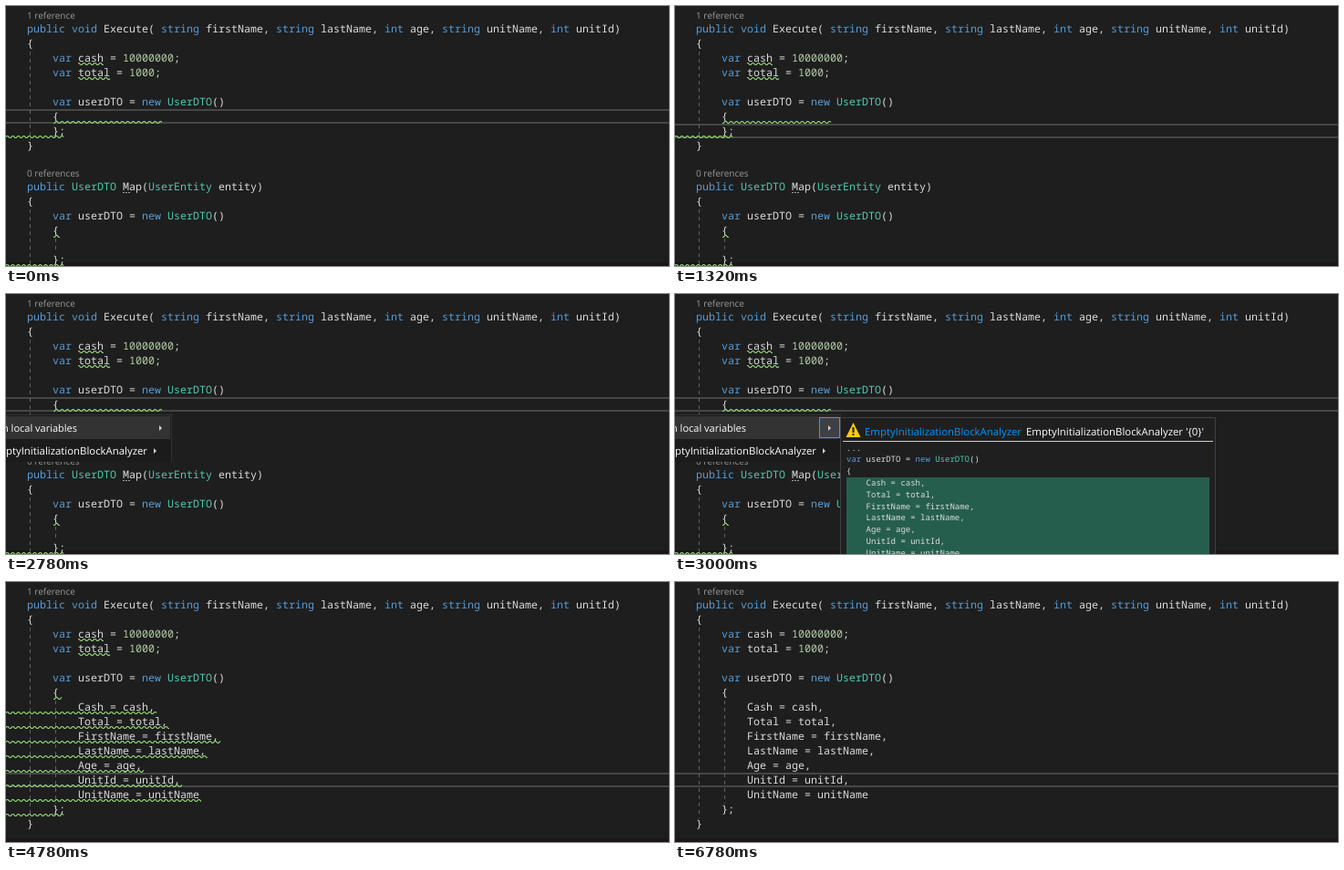
An HTML page with a canvas that plays this animation: 727 by 285 pixels, repeating every 7790 ms.

```html
<!DOCTYPE html>
<html lang="en">
<head>
<meta charset="utf-8">
<style>
  html, body { margin: 0; width: 100%; height: 100%; overflow: hidden; background: #1e1e1e; }
  canvas { display: block; }
</style>
</head>
<body>
<canvas id="stage" width="727" height="285"></canvas>
<script>
const ctx = document.getElementById('stage').getContext('2d');
const WIDTH = 727, HEIGHT = 285, LOOP = 7790;
const LEFT = 23, COL = 7, LINE = 16;
const MONO = '"Noto Sans Mono", monospace';
const SANS = '"Open Sans", sans-serif';
const TEXT = '#dcdcdc';

const SIGNATURE = 'public void Execute( string firstName, string lastName, int age, string unitName, int unitId)';
const FIELDS = ['Cash = cash,', 'Total = total,', 'FirstName = firstName,', 'LastName = lastName,',
  'Age = age,', 'UnitId = unitId,', 'UnitName = unitName'];

// Pointer keyframes: start time, then x and y of the centre; no position hides it.
const POINTER = [
  [0], [120, 268, 274], [200, 160, 184], [280, 110.5, 144], [420, 105.5, 139],
  [560, 95.5, 136], [640, 86.5, 133.5], [800, 84.5, 134], [940, 98.5, 195], [1020],
  [6620, 503.5, 287], [6700, 491.5, 288], [6780]
];

const within = (t, from, to) => t >= from && t < to;

function box(x, y, w, h, color) {
  ctx.fillStyle = color;
  ctx.fillRect(x, y, w, h);
}

function frame(x, y, w, h, color) {
  ctx.strokeStyle = color;
  ctx.lineWidth = 1;
  ctx.strokeRect(x + 0.5, y + 0.5, w - 1, h - 1);
}

function label(text, x, y, size, color, align = 'left') {
  ctx.font = `${size}px ${SANS}`;
  ctx.textAlign = align;
  ctx.fillStyle = color;
  ctx.fillText(text, x, y);
}

function tokenColor(token) {
  if (/^(public|void|string|int|var|new)$/.test(token)) return '#569cd6';
  if (/^User(DTO|Entity)$/.test(token)) return '#4ec9b0';
  return /^\d/.test(token) ? '#b5cea8' : TEXT;
}

function code(text, x, y, advance = COL) {
  ctx.font = `500 ${advance / 0.6}px ${MONO}`;
  ctx.textAlign = 'left';
  for (const { 0: token, index } of text.matchAll(/\w+|[^\w\s]+/g)) {
    ctx.fillStyle = tokenColor(token);
    ctx.fillText(token, x + index * advance, y);
  }
}

function lines(list, y) {
  list.forEach((text, i) => code(text, LEFT, y + i * LINE));
}

function squiggle(from, to, baseline) {
  ctx.strokeStyle = '#8fd675';
  ctx.lineWidth = 1.1;
  ctx.beginPath();
  for (let x = from; x <= to; x++) {
    ctx.lineTo(x, baseline + 2.5 - 1.2 * Math.sin(x * Math.PI / 3));
  }
  ctx.stroke();
}

function guide(x, from, to) {
  ctx.strokeStyle = '#626262';
  ctx.lineWidth = 1;
  ctx.setLineDash([4, 4]);
  ctx.beginPath();
  ctx.moveTo(x + 0.5, from);
  ctx.lineTo(x + 0.5, to);
  ctx.stroke();
  ctx.setLineDash([]);
}

function currentLine(y) {
  box(0, y, WIDTH, 2, '#464646');
  box(0, y + 14, WIDTH, 2, '#464646');
}

function triangle(x1, y1, x2, y2, x3, y3, color) {
  ctx.fillStyle = color;
  ctx.beginPath();
  ctx.moveTo(x1, y1);
  ctx.lineTo(x2, y2);
  ctx.lineTo(x3, y3);
  ctx.fill();
}

function header(references) {
  label(references, LEFT, 14, 10, '#999999');
  lines([SIGNATURE, '{', '    var cash = 10000000;', '    var total = 1000;', '',
    '    var userDTO = new UserDTO()', '    {'], 29);
}

function emptyCode() {
  header('1 reference');
  guide(26, 50, 147);
  lines(['    };', '}'], 141);
  label('0 references', LEFT, 187, 10, '#999999');
  lines(['public UserDTO Map(UserEntity entity)', '{', '    var userDTO = new UserDTO()', '    {', '', '    };'], 202);
  guide(26, 223, HEIGHT);
  guide(54, 255, 271);
  for (let x = 128; x <= 134; x += 3) box(x, 204, 2, 1, '#a0a0a0');
  squiggle(79, 107, 61);
  squiggle(79, 114, 77);
  squiggle(52, 171, 125);
  squiggle(0, 63, 141);
  squiggle(52, 59, 250);
  squiggle(0, 63, 282);
}

function filledCode(t) {
  header(within(t, 5790, 5930) ? '0 references' : '1 reference');
  guide(26, 50, 259);
  guide(54, 130, 243);
  lines([...FIELDS.map(field => '        ' + field), '    };', '}'], 141);
  if (t >= 5410) return;
  squiggle(79, 107, 61);
  squiggle(79, 114, 77);
  squiggle(52, 61, 125);
  FIELDS.forEach((field, i) => squiggle(0, 81 + field.length * COL, 141 + i * LINE));
  squiggle(0, 63, 253);
}

function menu(open) {
  box(0, 132, 182, 52, '#1b1b1c');
  box(0, 132, 182, 1, '#333337');
  box(181, 132, 1, 52, '#333337');
  box(0, 134, 180, 25, '#333334');
  if (open) {
    box(158, 135, 23, 23, '#3f3f46');
    frame(158, 135, 23, 23, '#3399ff');
  }
  label('n local variables', 78, 151, 11, '#ffffff', 'right');
  label('ptyInitializationBlockAnalyzer', 155, 176, 11.38, '#ffffff', 'right');
  triangle(168, 144, 171, 147, 168, 150, '#d0d0d0');
  triangle(162, 169, 165, 172, 162, 175, '#d0d0d0');
}

function preview() {
  const advance = 5.4, step = 12.75;
  box(181, 135, 412, 150, '#1f1f20');
  frame(181, 135, 412, 151, '#3f3f46');
  triangle(195.5, 141, 203.5, 157, 187.5, 157, '#ffcc00');
  box(194.5, 146, 2, 6, '#1e1e1e');
  box(194.5, 153, 2, 2, '#1e1e1e');
  const name = 'EmptyInitializationBlockAnalyzer';
  label(name, 208, 155, 11.38, '#0097fb');
  label(name + " '{0}'", 385, 155, 11.38, '#ffffff');
  box(184, 161, 406, 1, '#d0d0d0');
  box(188, 201, 398, 84, '#265e4d');
  code('...', 188, 172, advance);
  code('var userDTO = new UserDTO()', 188, 184, advance);
  code('{', 188, 197, advance);
  FIELDS.forEach((field, i) => code(field, 188 + 4 * advance, 210 + i * step, advance));
}

function pointer(t) {
  const [, x, y] = POINTER.findLast(key => t >= key[0]);
  if (x === undefined) return;
  const left = Math.floor(x), top = Math.round(y) - 8;
  box(left, top + 1, 1, 14, '#e6e6e6');
  for (const edge of [top, top + 15]) {
    box(left - 3, edge, 3, 1, '#e6e6e6');
    box(left + 1, edge, 3, 1, '#e6e6e6');
  }
}

function draw(t) {
  const filled = t >= 4700;
  const lineTop = filled ? 209 : within(t, 860, 1780) ? 129 : 113;
  box(0, 0, WIDTH, HEIGHT, '#1e1e1e');
  box(0, 281, WIDTH, 4, '#1b1618');
  currentLine(lineTop);
  if (filled) filledCode(t);
  else emptyCode();
  if (within(t, 860, 1320) || within(t, 1780, 2320)) box(65, lineTop, 1, 15, TEXT);
  if (within(t, 2780, 4560)) menu(t >= 3000);
  if (within(t, 3000, 4560)) preview();
  pointer(t);
}

ctx.textRendering = 'geometricPrecision';
const start = performance.now();
function tick() {
  draw((performance.now() - start) % LOOP);
  requestAnimationFrame(tick);
}
tick();
</script>
</body>
</html>
```
